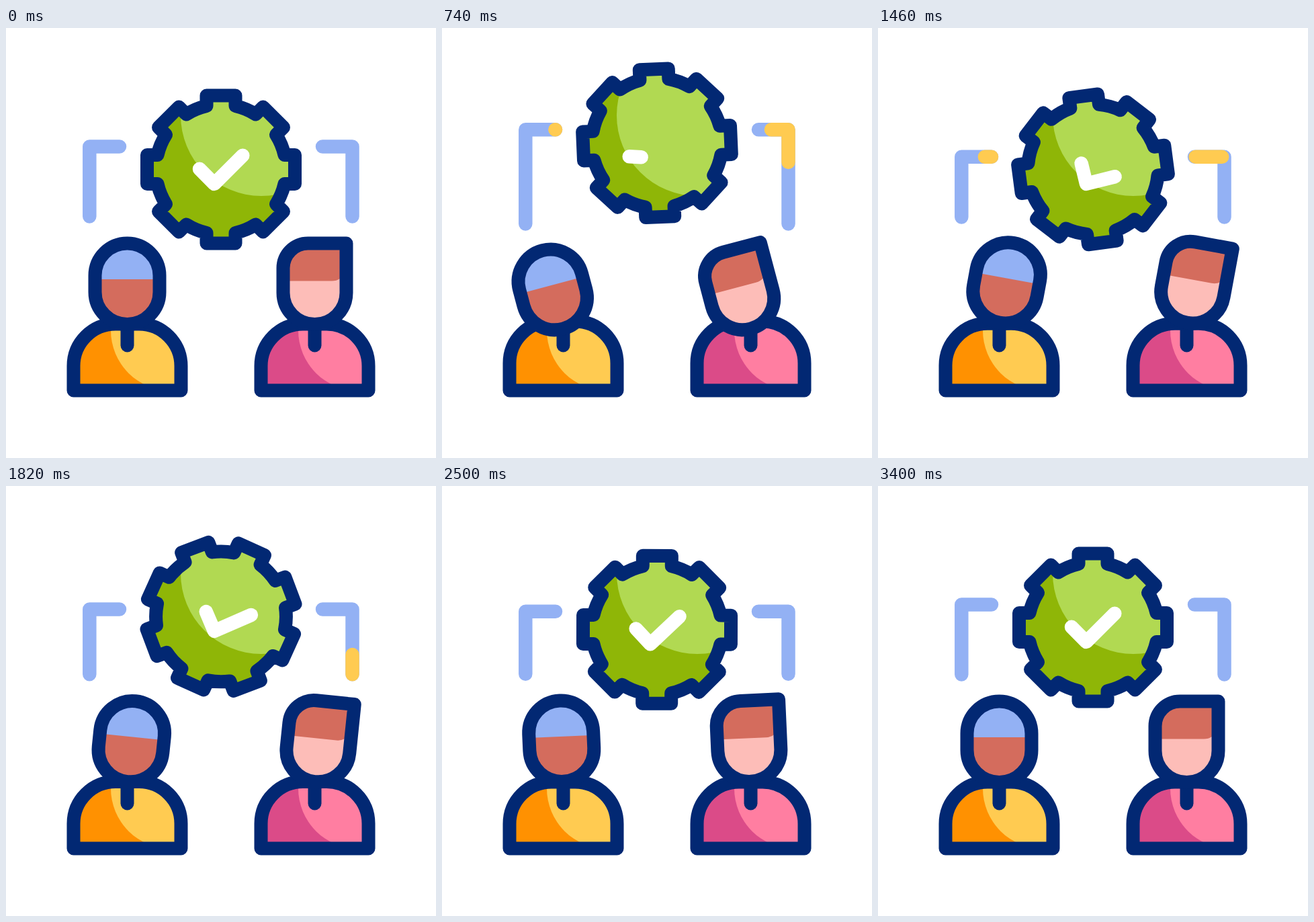
Animation, 640 px wide and 640 px high, one loop 3600 ms. Source, as an HTML page:

```html
<!DOCTYPE html>
<html lang="en">
<head>
<meta charset="utf-8">
<title>Approved teamwork</title>
<style>
  html, body { margin: 0; width: 100%; height: 100%; overflow: hidden; background: #fff; }
  svg { display: block; width: 100vw; height: 100vh; }
  .ink { fill: none; stroke: #022873; stroke-width: 20; stroke-linejoin: round; stroke-linecap: round; }
  .wire { fill: none; stroke: #93b1f4; stroke-width: 20.5; stroke-linejoin: round; stroke-linecap: round; }
  .pulse { stroke: #ffcb51; }
  .tick { stroke: #fff; }
</style>
</head>
<body>
<svg viewBox="0 0 640 640" xmlns="http://www.w3.org/2000/svg">
  <defs>
    <clipPath id="gearClip"><path class="gear"/></clipPath>
    <clipPath id="bodyClip"><path class="body"/></clipPath>
    <clipPath id="hoodClip"><path class="hood"/></clipPath>
    <clipPath id="hairClip"><path class="hair"/></clipPath>
  </defs>

  <path class="wire" id="wireL"/>
  <path class="wire" id="wireR"/>
  <path class="wire pulse" id="pulseL"/>
  <path class="wire pulse" id="pulseR"/>

  <g clip-path="url(#gearClip)">
    <rect width="640" height="640" fill="#8fb607"/>
    <circle cx="380" cy="130" r="120" fill="#b1d952"/>
  </g>
  <path class="gear ink"/>
  <path class="wire tick" id="tick"/>

  <g>
    <g clip-path="url(#bodyClip)">
      <rect x="90" y="420" width="181" height="130" fill="#ff9101"/>
      <circle cx="246" cy="450" r="90" fill="#ffcb51"/>
    </g>
    <path class="body ink"/>
    <path class="ink" d="M180.5 440V472.5"/>
  </g>
  <g transform="translate(279 0)">
    <g clip-path="url(#bodyClip)">
      <rect x="90" y="420" width="181" height="130" fill="#db4b88"/>
      <circle cx="246" cy="450" r="90" fill="#ff7ea1"/>
    </g>
    <path class="body ink"/>
    <path class="ink" d="M180.5 440V472.5"/>
  </g>

  <g id="headL">
    <g clip-path="url(#hoodClip)">
      <rect x="120" y="300" width="120" height="150" fill="#d46c5d"/>
      <rect x="120" y="300" width="120" height="74" fill="#93b1f4"/>
    </g>
    <path class="hood ink"/>
  </g>
  <g id="headR">
    <g clip-path="url(#hairClip)">
      <rect x="400" y="300" width="120" height="150" fill="#fdbdb8"/>
      <path fill="#d46c5d" d="M400 300H520V362L497 373Q492 376.5 485 376.5H400Z"/>
    </g>
    <path class="hair ink"/>
  </g>
</svg>

<script>
const LOOP = 3600;
const $ = id => document.getElementById(id);
const setAll = (cls, attr, value) =>
  document.querySelectorAll('.' + cls).forEach(el => el.setAttribute(attr, value));
const smooth = x => {
  x = Math.max(0, Math.min(1, x));
  return x * x * (3 - 2 * x);
};

// Eases from a rest value through a few [time, value] turning points
function swing(t, rest, ...turns) {
  let value = rest, start = 0, from = rest;
  for (const [time, to] of turns) {
    value += (to - from) * smooth((t - start) / (time - start));
    start = time;
    from = to;
  }
  return value;
}

const line = pts => 'M' + pts.map(p => p.map(n => n.toFixed(2)).join(' ')).join('L');

// Part of a polyline between two fractions of its length
function slice(pts, from, to) {
  const len = pts.slice(1).map((p, i) => Math.hypot(p[0] - pts[i][0], p[1] - pts[i][1]));
  const total = len.reduce((a, b) => a + b, 0);
  const out = [];
  let pos = 0;
  len.forEach((l, i) => {
    const a = Math.max(from * total, pos), b = Math.min(to * total, pos + l);
    if (b > a) {
      const at = s => pts[i].map((n, k) => n + (pts[i + 1][k] - n) * (s - pos) / l);
      if (!out.length) out.push(at(a));
      out.push(at(b));
    }
    pos += l;
  });
  return out.length ? line(out) : '';
}

function gearPath() {
  let d = '';
  for (let i = 0; i < 8; i++) {
    const a = i * Math.PI / 4, c = Math.cos(a), s = Math.sin(a);
    const at = (x, y) => (x * c - y * s).toFixed(2) + ' ' + (x * s + y * c).toFixed(2);
    d += (i ? 'A97 97 0 0 1 ' : 'M') + at(-21.5, -94.5)
      + 'L' + at(-21.5, -110) + 'L' + at(21.5, -110) + 'L' + at(21.5, -94.5);
  }
  return d + 'A97 97 0 0 1 -21.5 -94.5Z';
}

// Two runs along a wire, the tail following the head
function pulse(pts, t, start) {
  for (const begin of [start, start + 795]) {
    const head = smooth((t - begin) / 560), tail = smooth((t - begin - 170) / 560);
    if (head > tail) return slice(pts, tail, head);
  }
  return '';
}

setAll('gear', 'd', gearPath());
setAll('hood', 'd', 'M132.5 368.5A48 48 0 0 1 228.5 368.5V393A48 48 0 0 1 132.5 393Z');
setAll('hair', 'd', 'M506.5 320.5H449.5A37 37 0 0 0 412.5 357.5V394A47 47 0 0 0 506.5 394Z');

function drawGear(t) {
  const y = swing(t, 0, [650, -44.5], [1190, 25.5], [1690, -20], [2250, 8], [2700, 0]);
  const turn = swing(t, 0, [640, -53.5], [1290, 39.5], [2550, 0]);
  const tilt = swing(t, 0, [630, -50], [1240, 33], [2700, 0]);
  const drawn = swing(t, 1, [840, 0.165], [1720, 1]);
  setAll('gear', 'transform', `translate(320 ${210.5 + y}) rotate(${turn})`);
  $('tick').setAttribute('transform', `translate(310 ${232 + y}) rotate(${tilt})`);
  $('tick').setAttribute('d', slice([[-22, -22.3], [0, 0], [42.3, -42.3]], 0, drawn));
}

function drawPeople(t) {
  const lift = swing(t, 0, [700, -4], [1200, -0.7], [2800, 0]);
  const y = swing(t, 0, [680, 7.5], [1170, -13], [1570, 0], [2250, -3], [2860, 2], [3400, 0]);
  const tilt = swing(t, 0, [640, -17.5], [1190, 11.8], [2650, -3], [3400, 0]);
  setAll('body', 'd', `M100.5 539.5V${503 + lift}a62.5 62.5 0 0 1 62.5 -62.5h35`
    + 'a62.5 62.5 0 0 1 62.5 62.5V539.5Z');
  $('headL').setAttribute('transform', `translate(0 ${y}) rotate(${tilt} 180.5 442)`);
  $('headR').setAttribute('transform', `translate(0 ${y}) rotate(${tilt} 459.5 442)`);
}

function drawWires(t) {
  const top = swing(t, 176.5, [640, 146.5], [1210, 202.5], [1720, 180.5], [2200, 206], [2700, 176.5]);
  const end = swing(t, 280.5, [700, 292], [1160, 274.5], [1480, 281.5], [2200, 279], [2860, 280.5]);
  const left = [[124.3, end], [124.3, top], [169, top]];
  const right = [[471, top], [515.5, top], [515.5, end]];
  $('wireL').setAttribute('d', line(left));
  $('wireR').setAttribute('d', line(right));
  $('pulseL').setAttribute('d', pulse(left, t, 30));
  $('pulseR').setAttribute('d', pulse(right, t, 460));
}

function draw(t) {
  drawGear(t);
  drawPeople(t);
  drawWires(t);
}

const t0 = performance.now();
function frame() {
  draw((performance.now() - t0) % LOOP);
  requestAnimationFrame(frame);
}
draw(0);
requestAnimationFrame(frame);
</script>
</body>
</html>
```
